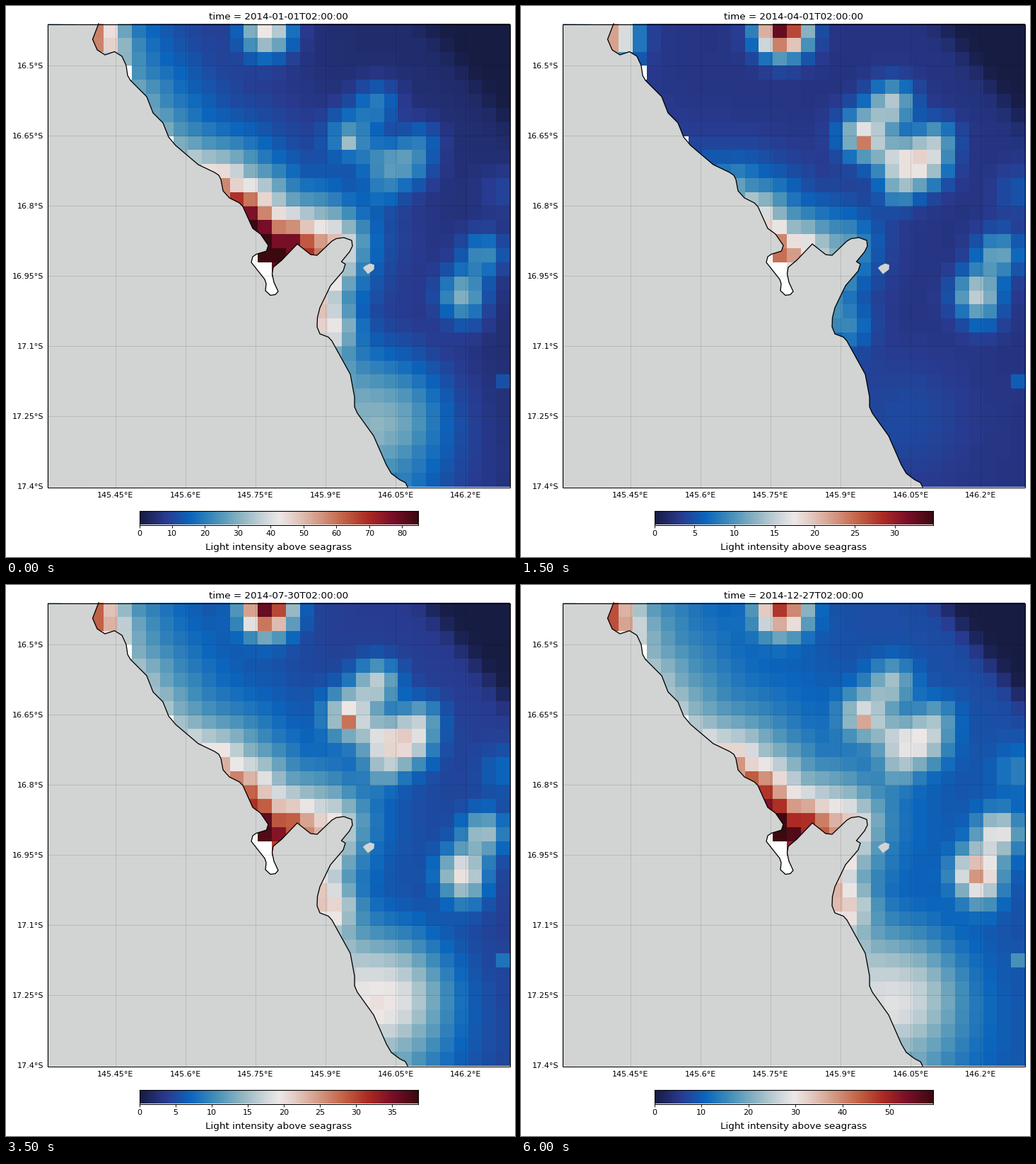
Animation of 720x778 px, one loop 6.5 s. Source, as a matplotlib script:

```python
import numpy as np
import matplotlib.pyplot as plt
from matplotlib.animation import FuncAnimation
from matplotlib.colors import LinearSegmentedColormap
from matplotlib.patches import Polygon, Rectangle

W, H, DPI = 720, 778, 64
PT = 72 / DPI                     # points per pixel
LEFT, RIGHT, TOP, BOTTOM = 58.5, 712.5, 25.5, 679.5
N = 33                            # cells per side
CELL = (RIGHT - LEFT) / N
FRAMES, INTERVAL = 13, 500
START = np.datetime64("2014-01-01T02:00:00")

plt.rcParams["font.family"] = "DejaVu Sans"

SHADES = ["#171c42", "#293a8f", "#0b66bd", "#4590b9", "#8eb5c2", "#d2d8db",
          "#e6d2cc", "#d59d89", "#c46548", "#ac2b24", "#780e28", "#3c0911"]
stops = [(i / 11, c) for i, c in enumerate(SHADES)]
stops.insert(6, (0.5, "#ede8e7"))
BALANCE = LinearSegmentedColormap.from_list("balance", stops, N=256)
LAND = "#d2d4d3"

# Keyframes: colour range, then strength of each feature as a share of it
MONTHS = [0, 2, 4, 6, 9, 10, 12]
PEAK = [84.8, 25.2, 44.3, 26.6, 62.4, 86.2, 59.2]
OFFSHORE = [.05, .09, .06, .10, .08, .06, .13]
INSHORE = [.27, .02, 0, .20, .50, .22, .27]
MUD = [.78, .50, .50, .35, .70, .75, .55]
REEF = [.30, .62, .58, .57, .56, .38, .45]
SOUTH = [.22, .04, .06, .40, .17, .20, .26]

COAST = [
    (131, 25), (122.5, 47), (129, 62), (140, 69), (153.5, 64.5), (164, 71),
    (170, 84), (172, 98), (176, 105), (199, 128), (208, 151), (222, 165),
    (230, 185), (240, 197), (272, 224), (295, 235), (301, 239), (304, 245),
    (307, 261), (316, 271), (330, 278), (335, 283), (349, 314), (360, 322),
    (371, 338), (368.5, 346), (354, 350.5), (349, 354), (347, 362),
    (366, 386), (368, 392), (367, 402), (374, 408.5), (381, 407.5),
    (385, 403), (379, 390), (376.5, 378), (378, 369), (390, 359),
    (412, 336), (431, 351), (440, 352), (461, 332), (467, 328.5),
    (478, 327), (489, 331), (490, 339), (486, 347), (474.5, 361),
    (480, 364.5), (477, 374), (459, 395), (444, 426), (440.5, 440),
    (440, 453), (444, 463), (456, 467.5), (461, 473), (487, 520),
    (493, 552), (493, 566), (497, 575), (520, 607), (538, 648),
    (545, 660), (557, 669), (565, 673), (568, 679)]
ISLAND = [(505, 370), (508, 367), (515, 363.5), (521, 365.5),
          (520.5, 372), (512, 378.5)]

rows, cols = np.mgrid[0:N, 0:N]


def bump(col, row, spread):
    return np.exp(-((cols - col) ** 2 + (rows - row) ** 2) / (2 * spread ** 2))


def bumps(*parts):
    return sum(height * bump(c, r, s) for c, r, height, s in parts)


def sigmoid(x):
    return 1 / (1 + np.exp(-x))


def shore_distance():
    """Distance in cells from each cell centre to the coast line."""
    line = (np.array(COAST) - (LEFT, TOP)) / CELL - 0.5
    cells = np.stack([cols, rows], axis=-1)[:, :, None, :]
    start, step = line[:-1], np.diff(line, axis=0)
    along = ((cells - start) * step).sum(-1) / (step ** 2).sum(-1)
    nearest = start + np.clip(along, 0, 1)[..., None] * step
    return np.linalg.norm(cells - nearest, axis=-1).min(-1)


shore = shore_distance()
glow = np.exp(-shore / 4) * (.45 + .55 * sigmoid(20 - cols))
plume = np.exp(-shore / 2.5) * bump(15, 15, 4)
clear = sigmoid(-2.5 * ((cols - 26) * .77 - rows * .64 - .6))  # dark deep corner
harbour = bump(15.3, 16, .9)
cape = bump(3, 0.5, 1.2)
cove = bump(20, 21, 1.1)
delta = bump(24, 27.5, 3)
north_reef = bump(15.2, 0, 1.2)
ring_reef = bumps((21, 7.4, .66, 1.2), (21, 8, .4, .4), (23, 5.2, .55, 1.1),
                  (25.2, 9.5, .65, 1.2), (26.2, 7.7, .35, 1),
                  (23.2, 9.3, .45, 1.1), (23.5, 11.4, .3, .9))
east_reef = bumps((29.1, 18.7, .95, 1.15), (30.6, 15.9, .7, 1.1),
                  (29.5, 20.5, .2, 1), (32, 11.5, .2, 1.2), (32, 25, .25, .35))

missing = (cols <= 15) & (rows >= 17) | (cols <= 16) & (rows >= 18)
for r, c in [(3, 5), (8, 8), (16, 14)]:
    missing[r, c] = True


def intensity(i):
    offshore, inshore, mud, reef, south = (
        np.interp(i, MONTHS, key)
        for key in (OFFSHORE, INSHORE, MUD, REEF, SOUTH))
    field = clear * (offshore + inshore * glow)
    field += mud * plume + .2 * harbour + south * delta
    field += (.6 - .75 * inshore) * cape + (.12 + .3 * inshore) * cove
    field += reef * (1.45 * north_reef + ring_reef)
    field += (.15 + 2.8 * offshore) * east_reef
    return np.ma.array(np.clip(field, 0, 1), mask=missing)


fig = plt.figure(figsize=(W / DPI, H / DPI), dpi=DPI, facecolor="white")
ax = fig.add_axes([0, 0, 1, 1])


def label(x, y, text, size, ha="center"):
    return ax.text(x, y, text, fontsize=size * PT, ha=ha, va="baseline")


water = ax.imshow(intensity(0), cmap=BALANCE, vmin=0, vmax=1, aspect="auto",
                  interpolation="nearest", extent=(LEFT, RIGHT, BOTTOM, TOP))

ax.add_patch(Polygon(COAST + [(LEFT, BOTTOM), (LEFT, TOP)], fc=LAND, ec="none"))
ax.add_patch(Polygon(ISLAND, fc=LAND, ec="none"))
ax.plot(*zip(*COAST), color="black", lw=1.3 * PT, solid_joinstyle="round")

grid = dict(color="black", alpha=0.13, lw=0.9 * PT)
for i in range(6):
    x = 155 + 99 * i
    ax.plot([x, x], [TOP, BOTTOM], **grid)
    label(x, 694.3, f"{145.45 + .15 * i:.5g}°E", 11.15)
for i in range(7):
    y = 83.8 + 99.1 * i
    if i < 6:
        ax.plot([LEFT, RIGHT], [y, y], **grid)
    label(53.3, y + 4, f"{16.5 + .15 * i:.4g}°S", 11.15, ha="right")

ax.add_patch(Rectangle((LEFT, TOP), RIGHT - LEFT, BOTTOM - TOP,
                       fill=False, ec="black", lw=1.1 * PT))
title = label(385.3, 18.8, "", 13.45)
label(385.3, 767.6, "Light intensity above seagrass", 13.45)
ax.set(xlim=(0, W), ylim=(H, 0))
ax.axis("off")

BAR_X, BAR_Y, BAR_W, BAR_H = 188.5, 712.5, 394, 20
bar = fig.add_axes([BAR_X / W, 1 - (BAR_Y + BAR_H) / H, BAR_W / W, BAR_H / H])
bar.imshow(np.linspace(0, 1, 256)[None, :], cmap=BALANCE, aspect="auto",
           extent=(0, 1, 0, 1))
bar.set_yticks([])
bar.tick_params(axis="x", length=3.9 * PT, width=0.9 * PT, pad=3.9 * PT,
                labelsize=11.15 * PT)
for spine in bar.spines.values():
    spine.set_linewidth(1.1 * PT)


def update(i):
    water.set_data(intensity(i))
    title.set_text(f"time = {START + np.timedelta64(30 * i, 'D')}")
    peak = np.interp(i, MONTHS, PEAK)
    ticks = np.arange(0, peak, 10 if peak > 50 else 5)
    bar.set_xticks(ticks / peak, [f"{t:.0f}" for t in ticks])
    return water, title


anim = FuncAnimation(fig, update, frames=FRAMES, interval=INTERVAL,
                     init_func=lambda: update(0), repeat=True, repeat_delay=0,
                     blit=False)
plt.show()
```
